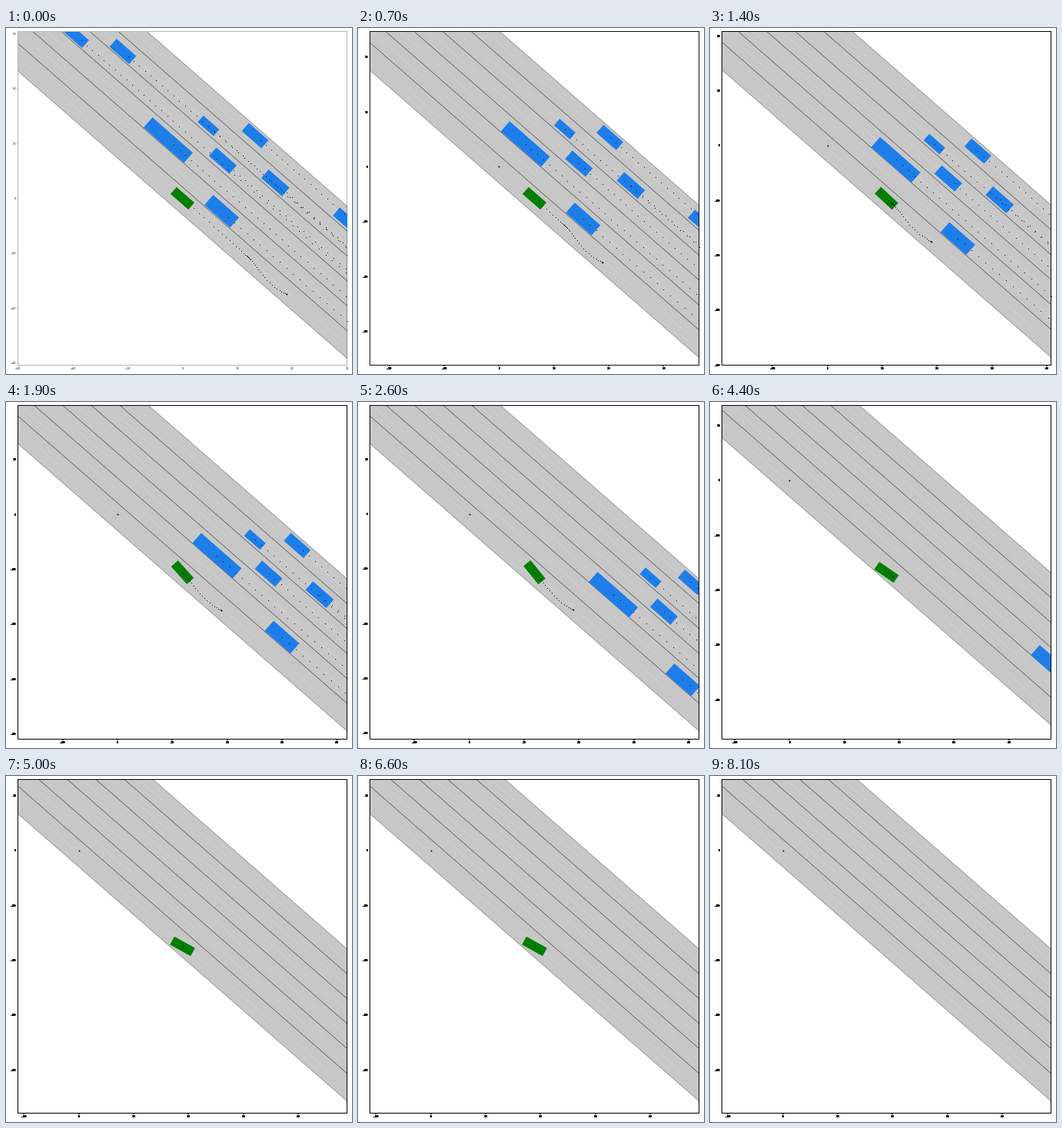
These frames come from a looping animation (450x450 px, 8.6 s). A matplotlib script:

```python
import numpy as np
import matplotlib.pyplot as plt
from matplotlib.animation import FuncAnimation
from matplotlib.artist import Artist
from matplotlib.patches import Polygon

SIZE, DPI = 450, 25
LEFT, TOP, RIGHT, BOTTOM = 15.5, 4.5, 443.5, 438.5
CX, CY = (LEFT + RIGHT) / 2, (TOP + BOTTOM) / 2
SCALE = (RIGHT - LEFT) / 60          # pixels per metre
HALF_X, HALF_Y = 30, (BOTTOM - TOP) / 2 / SCALE
FRAMES, GONE, BEHIND_GONE = 86, 81, 5
MAX_LAYERS = 18

# Positions below are pixels of the starting view
ROAD_X = np.array([-60, 1000])
ROAD_SLOPE, CAR_SLOPE = 0.873, 0.877
SHOULDER, LANE, LANE_COUNT = 36, 32.4, 6
CAR_ACCEL = 0.02
STOP, GOAL = np.array([314, 297]), np.array([364.5, 346.2])

# Start x, start y, length, speed per step
BEHIND = [(91, 10, 33, 7.1), (152, 30.5, 34, 7.1)]
AHEAD = [
    (211, 145.8, 69.8, 7.4),
    (263.3, 127.2, 27.5, 7.25),
    (324, 140, 34, 6.95),
    (282, 172.5, 35.2, 7.2),
    (350.3, 201.5, 36, 7.1),
    (280.5, 238.3, 44.5, 8.2),
    (442.5, 250, 34, 7),
]
CARS = BEHIND + AHEAD


def ramp(t, start, length):
    return np.clip((t - start) / length, 0, 1)


def smooth(u):
    return u * u * (3 - 2 * u)


def world(x, y):
    return (np.asarray(x) - CX) / SCALE, (CY - np.asarray(y)) / SCALE


def box(x, y, length, width, angle):
    a = np.radians(angle)
    along = np.array([np.cos(a), np.sin(a)]) * length / 2
    side = np.array([-np.sin(a), np.cos(a)]) * width / 2
    pts = np.array([x, y]) + [along + side, along - side, -along - side, -along + side]
    return np.column_stack(world(pts[:, 0], pts[:, 1]))


def ticks(c, half):
    first = np.ceil((c - half) / 10 - 1e-6)
    last = np.floor((c + half) / 10 + 1e-6)
    return np.arange(first, last + 1) * 10


def ego_path(t):
    """Brake in the lane, then swerve to the roadside and stop."""
    brake = 1 - (1 - ramp(t, 0, 18)) ** 1.6
    swerve = smooth(ramp(t, 24, 25) ** 1.2)
    bow = 4.4 * np.sin(np.pi * swerve ** 1.5) / np.sqrt(2)
    x = CX + (STOP[0] - CX) * brake + (GOAL[0] - STOP[0]) * swerve - bow
    y = CY + (STOP[1] - CY) * brake + (GOAL[1] - STOP[1]) * swerve + bow
    return x, y


def ego_heading(t):
    return 41 + 10 * smooth(ramp(t, 10, 14)) - 22 * smooth(ramp(t, 36, 12))


def car_path(x, y, speed, t):
    dx = speed * t + CAR_ACCEL * t * t
    return x + dx, y + CAR_SLOPE * dx


class FrameLayers(Artist):
    """Draws ticks and spines over themselves, so they darken."""
    count = 0

    def draw(self, renderer):
        ax = self.axes
        parts = [*ax.xaxis.get_major_ticks(), *ax.yaxis.get_major_ticks(),
                 *ax.spines.values()]
        for _ in range(self.count):
            for part in parts:
                part.draw(renderer)


fig = plt.figure(figsize=(SIZE / DPI, SIZE / DPI), dpi=DPI, facecolor="white")
ax = fig.add_axes([LEFT / SIZE, 1 - BOTTOM / SIZE,
                   (RIGHT - LEFT) / SIZE, (BOTTOM - TOP) / SIZE])
for spine in ax.spines.values():
    spine.set_snap(False)
layers = FrameLayers()
layers.set_zorder(10)
ax.add_artist(layers)

# Road
road_y = 56 + ROAD_SLOPE * (ROAD_X - LEFT)
bounds = [0] + [-SHOULDER - LANE * i for i in range(LANE_COUNT)]
outline = np.vstack([np.column_stack(world(ROAD_X, road_y)),
                     np.column_stack(world(ROAD_X, road_y + bounds[-1]))[::-1]])
ax.add_patch(Polygon(outline, fc="#c7c7c7", ec="none", zorder=1))
for low, high in zip(bounds, bounds[1:]):
    ax.plot(*world(ROAD_X, road_y + (low + high) / 2), color="#dddddd", lw=1, zorder=1.2)
for off in bounds:
    outer = off in (bounds[0], bounds[-1])
    ax.plot(*world(ROAD_X, road_y + off), color="#555555", lw=1.3 if outer else 2.1,
            zorder=1.4)

# Moving parts
DOT = dict(ls="none", marker="o", ms=3.2, mew=0)
boxes = [ax.add_patch(Polygon(np.zeros((4, 2)), fc="#1d7eea", ec="none", zorder=3))
         for _ in CARS]
trails = [ax.plot([], [], color="black", zorder=4, **DOT)[0] for _ in CARS]
ego = ax.add_patch(Polygon(np.zeros((4, 2)), fc="green", ec="none", zorder=5))
plan, = ax.plot([], [], color="black", zorder=6, **DOT)
ax.plot([0], [0], color="#0000b0", zorder=4.5, **{**DOT, "ms": 5.8})

steps = np.arange(GONE)
ego_x, ego_y = ego_path(steps)
tracks = [car_path(x, y, speed, steps) for x, y, _, speed in CARS]
car_angle = np.degrees(np.arctan(CAR_SLOPE))


def update(frame):
    n = min(frame, GONE - 1)
    cx, cy = world(ego_x[n], ego_y[n])
    ax.set_xlim(cx - HALF_X, cx + HALF_X)
    ax.set_ylim(cy - HALF_Y, cy + HALF_Y)
    ax.set_xticks(ticks(cx, HALF_X))
    ax.set_yticks(ticks(cy, HALF_Y))
    layers.count = min(n, MAX_LAYERS - 1)

    for car, patch, trail, (x, y) in zip(CARS, boxes, trails, tracks):
        length = car[2]
        width = min(0.41 * length, 17.5)
        patch.set_xy(box(x[n], y[n], length, width, car_angle))
        first = max(n, 1)
        trail.set_data(*world(x[first:], y[first:]))
        for part in (patch, trail):
            part.set_visible(car not in BEHIND or n < BEHIND_GONE)

    ego.set_xy(box(ego_x[n], ego_y[n], 30.7, 12, ego_heading(n)))
    plan.set_data(*world(ego_x[n:], ego_y[n:]))
    for part in (ego, plan):
        part.set_visible(frame < GONE)
    return []


anim = FuncAnimation(fig, update, frames=FRAMES, interval=100, repeat=True,
                     repeat_delay=0, init_func=lambda: update(0), blit=False)
plt.show()
```
